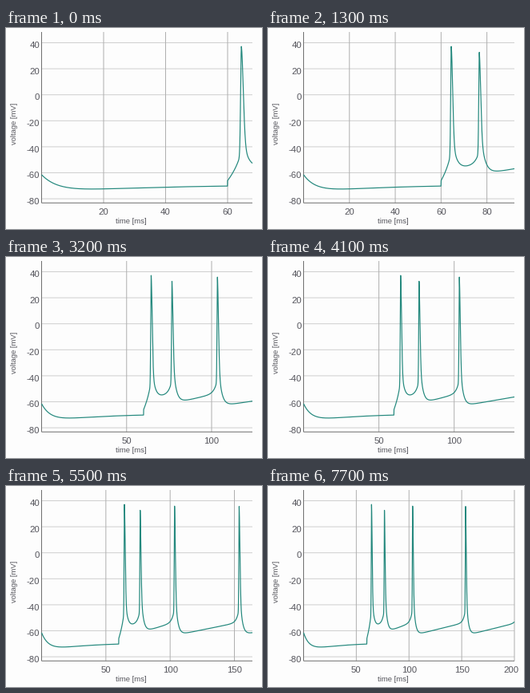
Animation of 320x252 px, one loop 8000 ms. Source, as a matplotlib script:

```python
import numpy as np
import matplotlib.pyplot as plt
from matplotlib.animation import FuncAnimation

W, H, DPI = 320, 252, 100
LEFT, RIGHT, TOP, BOTTOM = 44.5, 308, 5, 219.3
TEXT, AXIS, VGRID, HGRID, TEAL = "#55555c", "#707070", "#b0b0b0", "#cfcfcf", "#23887d"
STEP_MS = 100
FRAMES = 80

plt.rcParams["font.family"] = "Liberation Sans"


def px(p):
    """Pixels to points."""
    return p * 72 / DPI


def y_of(mv):
    return 18.5 + (40 - mv) * 1.63


def bell(u, sigma):
    return np.exp(-0.5 * (u / sigma) ** 2)


# Each stage opens with a spike (the first with the current step):
# start ms, peak mV, rebound mV, floor mV, slope mV/ms.
STAGES = [(60, -67, 0, -67, 2.8),
          (64.45, 37.3, 32, -57.8, 0.3),
          (76.7, 33, 46, -61.5, 0.3),
          (103.45, 36, 46, -63.6, 0.2),
          (153.7, 36, 46, -63.6, 0.2),
          (204, 36, 46, -63.6, 0.2)]
SWELL = 11  # mV gained just before a spike


def voltage(t):
    """Membrane potential: settling at rest, then ramps between spikes."""
    v = -69.2 - 6.6 * np.exp(-t / 32) + 14.3 * np.exp(-t / 5.3)
    for (t0, peak, rebound, floor, slope), (t1, peak1, *_) in zip(STAGES, STAGES[1:]):
        inside = (t >= t0) & (t < t1)
        u, left = t[inside] - t0, t1 - t[inside]
        rise = peak1 - floor - slope * (t1 - t0) - SWELL
        v[inside] = (floor + slope * u
                     + rebound * np.exp(-u / 1.7) + SWELL * np.exp(-left / 1.8)
                     + (peak - floor - rebound) * bell(u, 0.62)
                     + rise * bell(left, 0.25))
    return v


times = np.arange(0, 200.001, 0.04)
trace_y = y_of(voltage(times))

fig = plt.figure(figsize=(W / DPI, H / DPI), dpi=DPI, facecolor="#fdfdfd")
ax = fig.add_axes([0, 0, 1, 1])
ax.set_xlim(0, W)
ax.set_ylim(H, 0)
ax.axis("off")


def line(xs, ys, color, width=1, z=1):
    return ax.plot(xs, ys, color=color, lw=px(width), zorder=z,
                   solid_capstyle="butt", snap=False)[0]


def label(x, y, text, size=11.4, ha="center", **kw):
    return ax.text(x, y, text, fontsize=px(size), color=TEXT, ha=ha, **kw)


for mv in range(-80, 41, 20):
    y = y_of(mv)
    line([LEFT, RIGHT], [y, y], HGRID)
    label(42.3, y + 6.8, str(mv), ha="right", va="baseline")
line([LEFT, LEFT], [TOP, BOTTOM], AXIS, z=3)
line([LEFT, RIGHT], [BOTTOM, BOTTOM], AXIS, z=3)
label(156, 245, "time [ms]", 9.5, va="baseline")
label(11, 119.5, "voltage [mV]", 9.4, va="center", rotation=90)

grid = [line([], [], VGRID, z=2) for _ in range(5)]
ticks = [label(0, 234.2, "", va="baseline") for _ in range(5)]
trace = line([], [], TEAL, 1.2, z=4)
trace.set_solid_joinstyle("round")


def draw(frame):
    # The time axis grows by 4 ms at each redraw.
    t_max = 68 + 4 * int((frame * STEP_MS + 199) / 237.4)
    scale = (RIGHT - LEFT) / t_max
    step = 20 if t_max <= 100 else 50
    for i, (g, tick) in enumerate(zip(grid, ticks), 1):
        t = i * step
        shown = t <= t_max
        x = LEFT + t * scale
        g.set_data([x, x], [TOP, BOTTOM])
        g.set_visible(shown)
        # Keep the last label inside the right margin.
        tick.set_x(min(x, 313 - 3.17 * len(str(t))))
        tick.set_text(str(t))
        tick.set_visible(shown)
    n = np.searchsorted(times, t_max + 0.01)
    trace.set_data(LEFT + times[:n] * scale, trace_y[:n])
    return [*grid, *ticks, trace]


anim = FuncAnimation(fig, draw, frames=FRAMES, init_func=lambda: draw(0),
                     interval=STEP_MS, repeat=True, repeat_delay=0)
plt.show()
```
